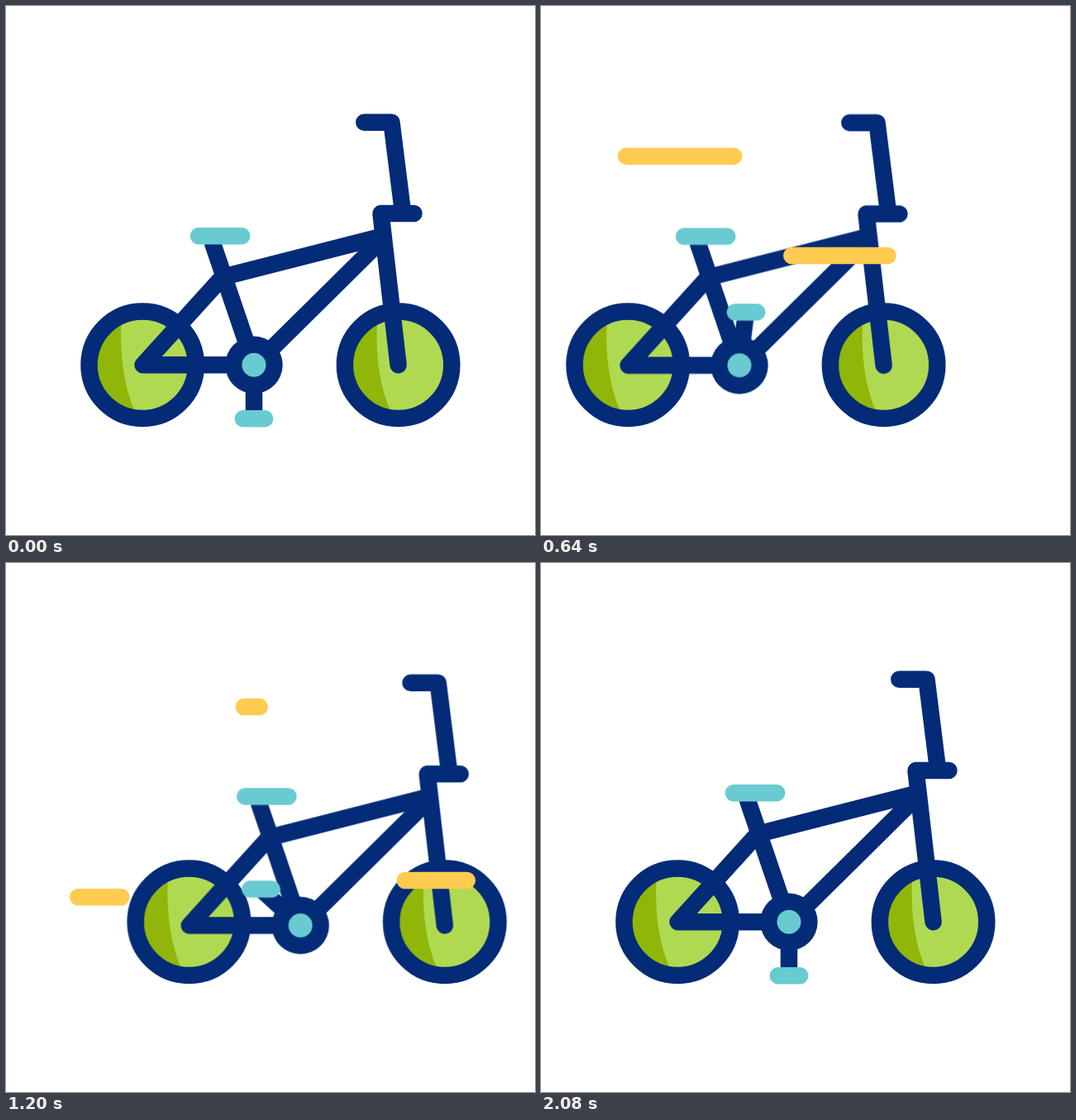
An HTML page that plays this animation: 640 px wide and 640 px high, repeating every 2.42 s.

```html
<!DOCTYPE html>
<html lang="en">
<head>
<meta charset="utf-8">
<title>Bicycle</title>
<style>
  @property --head { syntax: "<number>"; inherits: false; initial-value: 0; }
  @property --tail { syntax: "<number>"; inherits: false; initial-value: 0; }

  :root {
    --navy: #032b77;
    --teal: #68cbd1;
    --yellow: #ffcb50;
    --ease: cubic-bezier(.3333, 0, .6667, 1);
  }
  html, body { margin: 0; width: 100%; height: 100%; overflow: hidden; background: #fff; }
  svg { display: block; width: 100vw; height: 100vh; }

  .tube, .soft, .wind line {
    fill: none;
    stroke-width: 20.5;
    stroke-linecap: round;
    stroke-linejoin: round;
  }
  .tube { stroke: var(--navy); }
  .soft { stroke: var(--teal); }
  .rim { fill: none; stroke: var(--navy); stroke-width: 20.5; }

  .bike, .frame, .crank, .pedal { animation: 2420ms var(--ease) infinite; }
  .bike { animation-name: ride; }
  .frame { animation-name: bob; }
  .crank { animation-name: spin; transform-origin: 300px 434.3px; }
  .pedal { animation-name: level; transform-origin: 300px 499.2px; }

  @keyframes ride {
    0%, 79.3%, 100% { transform: translateX(0); }
    21.57% { transform: translateX(-69px); }
    51.74% { transform: translateX(58px); }
  }
  @keyframes bob {
    0%, 28.65%, 57.3%, 85.95%, 100% { transform: translateY(0); }
    14.325%, 42.975%, 71.625% { transform: translateY(7.6px); }
  }
  @keyframes spin {
    0% { transform: rotate(0deg); }
    79.34%, 100% { transform: rotate(720deg); }
  }
  @keyframes level {
    0% { transform: rotate(0deg); }
    79.34%, 100% { transform: rotate(-720deg); }
  }

  /* Each streak grows leftwards, then its right end catches up. */
  .wind line {
    stroke: var(--yellow);
    stroke-dasharray: calc((var(--head) - var(--tail)) * 1px) 2px;
    stroke-dashoffset: calc(var(--tail) * -1px);
    visibility: hidden;
    animation: head 2420ms var(--ease) var(--at) infinite,
               tail 2420ms var(--ease) var(--at) infinite,
               show 2420ms step-end var(--at) infinite;
  }
  @keyframes head {
    0% { --head: 0; }
    18.22%, 100% { --head: 1; }
  }
  @keyframes tail {
    0%, 12.11% { --tail: 0; }
    28.02%, 100% { --tail: 1; }
  }
  @keyframes show {
    0% { visibility: visible; }
    28.02%, 100% { visibility: hidden; }
  }
</style>
</head>
<body>
<svg viewBox="0 0 640 640">
  <defs>
    <g id="wheel">
      <circle r="60" fill="#b0d952"/>
      <path d="M-25.7 -52C-27.5 -10 -22.5 26 -9 57A58 58 0 0 1 -25.7 -52Z" fill="#8fb608"/>
      <circle class="rim" r="64.7"/>
    </g>
  </defs>

  <g class="bike">
    <use href="#wheel" x="165.2" y="434.2"/>
    <use href="#wheel" x="474.6" y="434.2"/>
    <g class="frame">
      <path class="tube" d="M250 287L300 434.3H165.5L262 328L454 279"/>
      <path class="tube" d="M301.5 434.3L455 282.5"/>
      <path class="tube" d="M474.6 434.3L453.5 251H493.5"/>
      <path class="tube" d="M433.3 140.8H466.5L480 249"/>
      <path class="soft" d="M233 278.2H285.3"/>
      <circle cx="300" cy="434.3" r="34.7" fill="var(--navy)"/>
      <g class="crank">
        <path class="tube" d="M300 434.3V494"/>
        <path class="soft pedal" d="M286.8 499.2H313.2"/>
      </g>
      <circle cx="300" cy="434.3" r="14.5" fill="var(--teal)"/>
    </g>
  </g>

  <g class="wind">
    <line pathLength="1" x1="258.7" x2="97.2" y1="181.8" y2="181.8" style="--at: 251ms"/>
    <line pathLength="1" x1="419.5" x2="220.2" y1="302" y2="302" style="--at: 396ms"/>
    <line pathLength="1" x1="286.7" x2="87.2" y1="404.3" y2="404.3" style="--at: 652ms"/>
    <line pathLength="1" x1="557.8" x2="358.6" y1="384" y2="384" style="--at: 1017ms"/>
    <line pathLength="1" x1="306.8" x2="107.4" y1="174" y2="174" style="--at: 1117ms"/>
    <line pathLength="1" x1="568" x2="369" y1="233" y2="233" style="--at: 1308ms"/>
  </g>
</svg>
</body>
</html>
```
